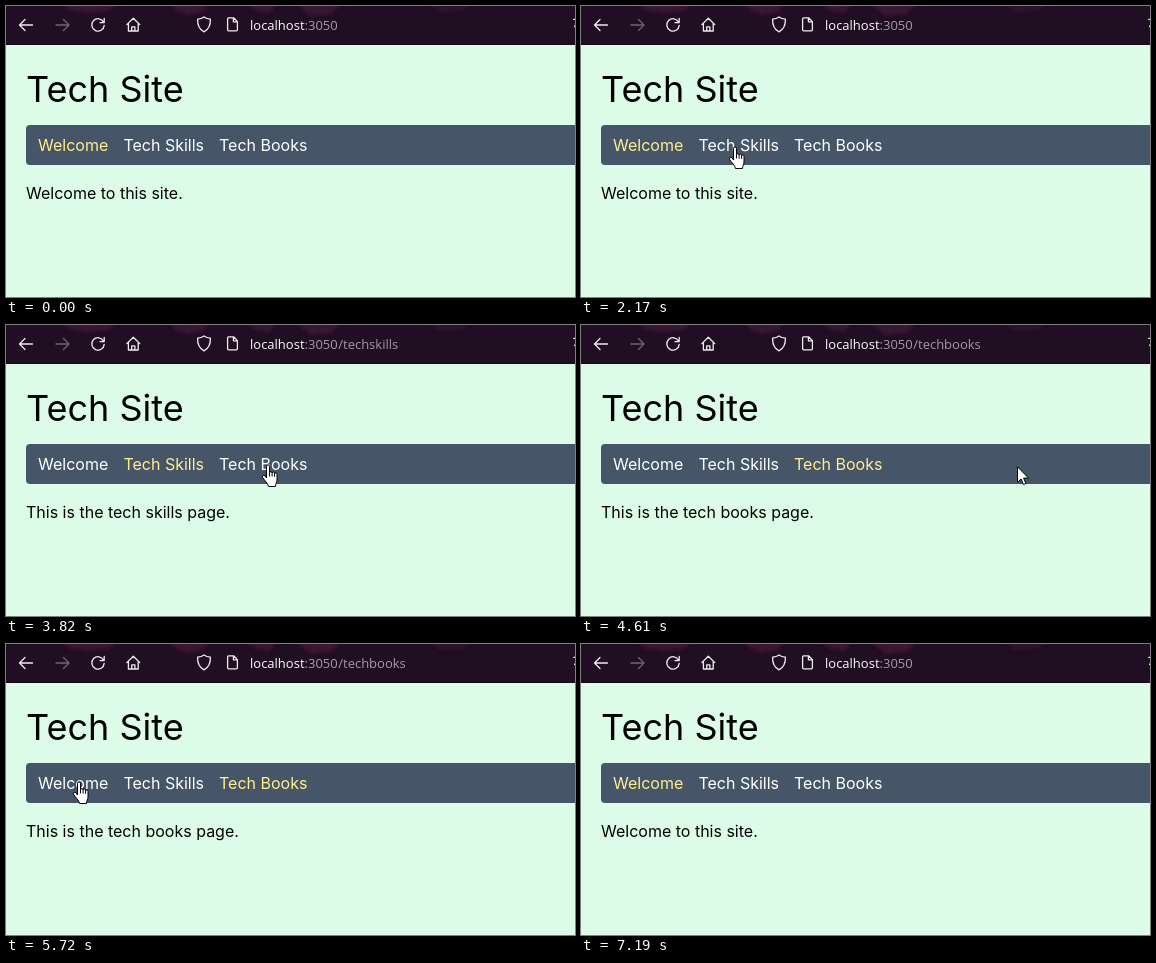
An HTML page for the animation above (7.93 s loop, 569 by 291 pixels).

```html
<!DOCTYPE html>
<html lang="en">
<head>
<meta charset="utf-8">
<title>Tech Site</title>
<style>
html, body { margin: 0; width: 100%; height: 100%; overflow: hidden; background: #dcfce7; }
svg { display: block; }
text { font: 16px Inter, sans-serif; white-space: pre; }
.title { font-size: 36px; }
.url text { font: 13px "Open Sans", "Noto Sans", sans-serif; fill: #a39ba6; }
.url .host { fill: #fbfbfe; }
.icon { fill: none; stroke: #eeeaf0; stroke-width: 1.3; stroke-linecap: round; stroke-linejoin: round; }
.dim { stroke: #71646f; }
.nav text { fill: #fff; }

/* Every change is a hard cut on one 7.93 s clock */
.welcome, .skills, .books, .nav text, #cursor, #pointer, #arrow, #hand {
  animation: 7930ms step-end infinite;
}
.welcome { animation-name: on-welcome; }
.skills { animation-name: on-skills; }
.books { animation-name: on-books; }
.nav .to-welcome { animation-name: lit-welcome; }
.nav .to-skills { animation-name: lit-skills; }
.nav .to-books { animation-name: lit-books; }
#cursor { animation-name: shown; }
#pointer { animation-name: travel; }
#arrow { animation-name: as-arrow; }
#hand { animation-name: as-hand; }

@keyframes on-welcome { 0%, 75.914%, 100% { opacity: 1 } 34.3% { opacity: 0 } }
@keyframes on-skills { 0%, 51.828%, 100% { opacity: 0 } 34.3% { opacity: 1 } }
@keyframes on-books { 0%, 75.914%, 100% { opacity: 0 } 51.828% { opacity: 1 } }
@keyframes lit-welcome { 0%, 75.914%, 100% { fill: #fef08a } 34.3% { fill: #fff } }
@keyframes lit-skills { 0%, 51.828%, 100% { fill: #fff } 34.3% { fill: #fef08a } }
@keyframes lit-books { 0%, 75.914%, 100% { fill: #fff } 51.828% { fill: #fef08a } }
@keyframes shown { 0%, 90.668%, 100% { opacity: 0 } 20.428% { opacity: 1 } }
@keyframes as-hand {
  0%, 37.326%, 53.404%, 77.805%, 100% { opacity: 0 }
  25.851%, 48.171%, 70.239% { opacity: 1 }
}
@keyframes as-arrow {
  0%, 37.326%, 53.404%, 77.805%, 100% { opacity: 1 }
  25.851%, 48.171%, 70.239% { opacity: 0 }
}
@keyframes travel {
  0%, 100% { transform: translate(168px, 243px) }
  22.32% { transform: translate(153px, 168px) }
  23.203% { transform: translate(150px, 165px) }
  24.085% { transform: translate(150px, 155px) }
  25.851% { transform: translate(146px, 143px) }
  27.364% { transform: translate(146px, 140px) }
  35.813% { transform: translate(158px, 141px) }
  37.326% { transform: translate(225px, 147px) }
  39.218% { transform: translate(278px, 189px) }
  41.235% { transform: translate(285px, 201px) }
  43.127% { transform: translate(283px, 196px) }
  44.703% { transform: translate(273px, 172px) }
  46.279% { transform: translate(261px, 148px) }
  48.171% { transform: translate(254px, 139px) }
  53.404% { transform: translate(350px, 140px) }
  54.981% { transform: translate(436px, 139px) }
  58.133% { transform: translate(436px, 141px) }
  59.646% { transform: translate(436px, 142px) }
  61.538% { transform: translate(414px, 186px) }
  63.429% { transform: translate(360px, 240px) }
  64.943% { transform: translate(240px, 255px) }
  66.456% { transform: translate(121px, 220px) }
  68.348% { transform: translate(80px, 165px) }
  70.239% { transform: translate(65px, 144px) }
  72.131% { transform: translate(65px, 137px) }
  77.805% { transform: translate(74px, 178px) }
  78.751% { transform: translate(79px, 181px) }
  79.697% { transform: translate(190px, 263px) }
  81.336% { transform: translate(249px, 245px) }
  88.776% { transform: translate(254px, 250px) }
}
</style>
</head>
<body>
<svg width="569" height="291" viewBox="0 0 569 291">
  <defs>
    <filter id="soft" x="-20%" y="-50%" width="140%" height="200%"><feGaussianBlur stdDeviation="2"/></filter>
    <clipPath id="bar"><path d="M0 0H569V39H0z"/></clipPath>
  </defs>

  <!-- Browser toolbar -->
  <g clip-path="url(#bar)">
    <path fill="#200e22" d="M0 0H569V39H0z"/>
    <g fill="#3b1230" filter="url(#soft)">
      <path d="M55 -4H112L104 5 82 7 62 4z"/>
      <path d="M163 -4H204L198 6 180 9 168 4z"/>
      <path d="M238 -4H272L264 7 250 5z"/>
      <path d="M288 -4H336L326 8 304 10z"/>
      <path d="M420 -4H470L456 5 434 7z" opacity=".5"/>
    </g>
    <path fill="#160a18" d="M0 38H569V39H0z"/>
  </g>
  <g class="icon">
    <path d="M26.5 19H13.5M19 13.5L13.5 19 19 24.5"/>
    <path class="dim" d="M50 19H63M57.5 13.5L63 19 57.5 24.5"/>
    <path d="M97.6 16.2A6.2 6.2 0 1 0 98.2 19.4M98.2 12.4V16.6H94"/>
    <path d="M120.8 18.6L127.3 12.2 133.8 18.6M122.4 17.4V25H132.2V17.4M125.7 25V20.8H128.9V25"/>
    <path d="M198 11C200 12.5 202 13 204.4 13.2C204.6 19 203 23.2 198 25.8C193 23.2 191.4 19 191.6 13.2C194 13 196 12.5 198 11z"/>
    <path d="M221.6 12.8Q221.6 11.8 222.6 11.8H227.6L231.4 15.6V23.8Q231.4 24.8 230.4 24.8H222.6Q221.6 24.8 221.6 23.8zM227.4 12V15.8H231.2"/>
    <path d="M567.8 13.4H570M568.6 20.5L570 18.5"/>
  </g>
  <g class="url">
    <text x="244" y="24"><tspan class="host">localhost</tspan>:3050</text>
    <text class="skills" x="332.3" y="24">/techskills</text>
    <text class="books" x="332.3" y="24">/techbooks</text>
  </g>

  <!-- Page -->
  <text class="title" x="20" y="96">Tech Site</text>
  <rect x="20" y="119" width="560" height="40" rx="4" fill="#475569"/>
  <g class="nav">
    <text class="to-welcome" x="32" y="145">Welcome</text>
    <text class="to-skills" x="117.4" y="145">Tech Skills</text>
    <text class="to-books" x="213" y="145">Tech Books</text>
  </g>
  <text class="welcome" x="20" y="193">Welcome to this site.</text>
  <text class="skills" x="20" y="193">This is the tech skills page.</text>
  <text class="books" x="20" y="193">This is the tech books page.</text>

  <g id="cursor">
    <g id="pointer" fill="#fff" stroke="#000">
      <path id="arrow" d="M.5 .8V16.4L4.1 13 6.5 18.5 8.9 17.5 6.6 12.1H11.5z"/>
      <g id="hand">
        <path d="M6.5 14V2.4A1.5 1.5 0 0 1 9.5 2.4V8.6A1.35 1.35 0 0 1 12.1 9A1.3 1.3 0 0 1 14.6 9.8A1.2 1.2 0 0 1 17 10.6V16C17 18.4 15.5 19.6 15.5 22.5H8.5C8.3 19.4 4.2 16.4 2.5 13.2C1.8 11.4 3.8 10.6 5 11.9z"/>
        <path fill="none" d="M9.5 8.6V12.4M12.1 9V12.6M14.6 9.8V12.8"/>
      </g>
    </g>
  </g>
</svg>
</body>
</html>
```
